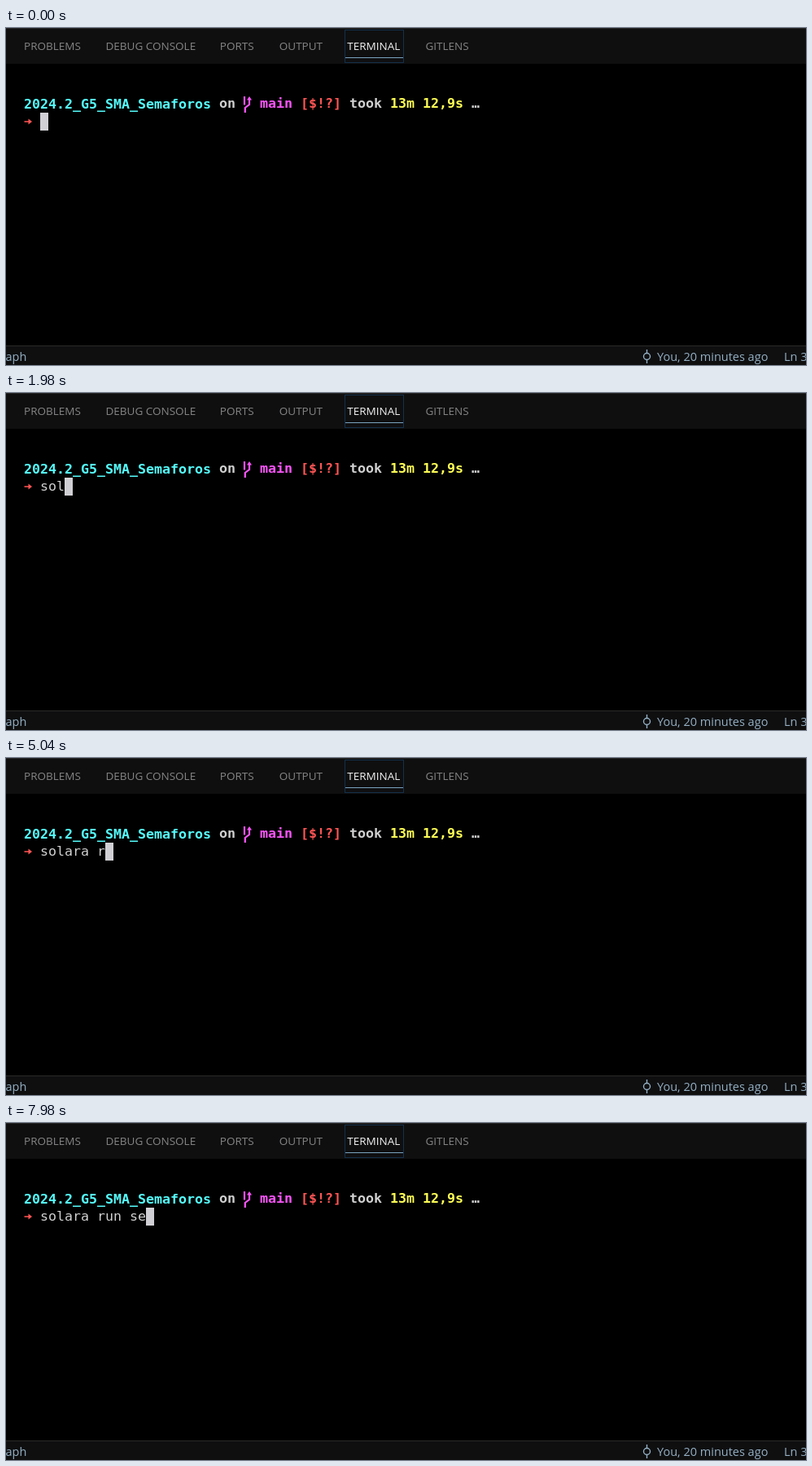
Recreate the animation shown at these times as an HTML page. Size 983x414 px, loop 8 s.

```html
<!DOCTYPE html>
<html lang="en">
<head>
<meta charset="utf-8">
<title>Terminal</title>
<style>
  html, body { margin: 0; width: 100%; height: 100%; overflow: hidden; background: #000; }
  svg { display: block; width: 983px; height: 414px; }
  text { white-space: pre; }
  .tabs, .status { font-family: "Open Sans", "Noto Sans", sans-serif; }
  .tabs { font-size: 13.5px; fill: #858585; }
  .status { font-size: 14.5px; fill: #94b0c4; }
  .term { font: 16.61px "DejaVu Sans Mono", monospace; fill: #d0d0d0; }
  .bold { font-weight: bold; }
  .cyan { fill: #55ffff; }
  .pink { fill: #ff55ff; }
  .red { fill: #ff5555; }
  .yellow { fill: #ffff55; }
</style>
</head>
<body>
<svg viewBox="0 0 983 414">
  <rect width="983" height="414" fill="#000"/>
  <rect width="983" height="44" fill="#0f0f10"/>
  <rect width="983" height="1" fill="#262626"/>
  <rect y="390" width="983" height="24" fill="#0f0f10"/>
  <rect y="390" width="983" height="1" fill="#2a2a28"/>

  <g class="tabs">
    <text x="22" y="27">PROBLEMS</text>
    <text x="122.5" y="27">DEBUG CONSOLE</text>
    <text x="262.8" y="27">PORTS</text>
    <text x="335.8" y="27">OUTPUT</text>
    <text x="419.3" y="27" fill="#f4f4f4">TERMINAL</text>
    <text x="515.5" y="27">GITLENS</text>
  </g>
  <rect x="416.5" y="2.5" width="72" height="40" fill="none" stroke="#14304a"/>
  <rect x="417" y="36" width="71" height="1" fill="#7ba3c0"/>

  <g class="term bold">
    <text x="22" y="99" class="cyan">2024.2_G5_SMA_Semaforos</text>
    <text x="262" y="98">on</text>
    <text x="312" y="98" class="pink">main</text>
    <text x="362" y="98" class="red">[$!?]</text>
    <text x="422" y="98">took</text>
    <text x="472" y="98" class="yellow">13m 12,9s</text>
    <text x="572" y="98">…</text>
  </g>
  <path d="M293 84V94.5M293.8 104V98L299 94V87" fill="none" stroke="#ff55ff" stroke-width="2.2"/>
  <path d="M296 88.5L299 84L302 88.5Z" class="pink"/>
  <path d="M22.5 114.2H27.5V111.5L32 115L27.5 118.5V115.8H22.5Z" class="red"/>

  <text id="command" class="term" x="42" y="120"></text>
  <rect id="cursor" x="42" y="104" width="10" height="22" fill="#d0d0d4"/>

  <g class="status">
    <text x="-0.5" y="409">aph</text>
    <text x="800" y="409">You, 20 minutes ago</text>
    <text x="956" y="409">Ln 3</text>
  </g>
  <g fill="none" stroke="#94b0c4" stroke-width="1.4">
    <circle cx="787.5" cy="403.5" r="4"/>
    <path d="M787.5 395V399.5M787.5 407.5V412"/>
  </g>
</svg>
<script>
  const LOOP = 8000;
  const COMMAND = "solara run se";
  const KEY_TIMES = [1100, 1420, 1720, 2260, 2640, 3080, 3440, 4740, 5860, 6320, 6920, 7220, 7840];
  const command = document.getElementById("command");
  const cursor = document.getElementById("cursor");
  const start = performance.now();
  let shown = -1;

  function render(now) {
    const time = Math.max(0, now - start) % LOOP;
    const typed = KEY_TIMES.filter(key => key <= time).length;
    if (typed !== shown) {
      shown = typed;
      command.textContent = COMMAND.slice(0, typed);
      cursor.setAttribute("x", 42 + typed * 10);
    }
    requestAnimationFrame(render);
  }
  render(start);
</script>
</body>
</html>
```
